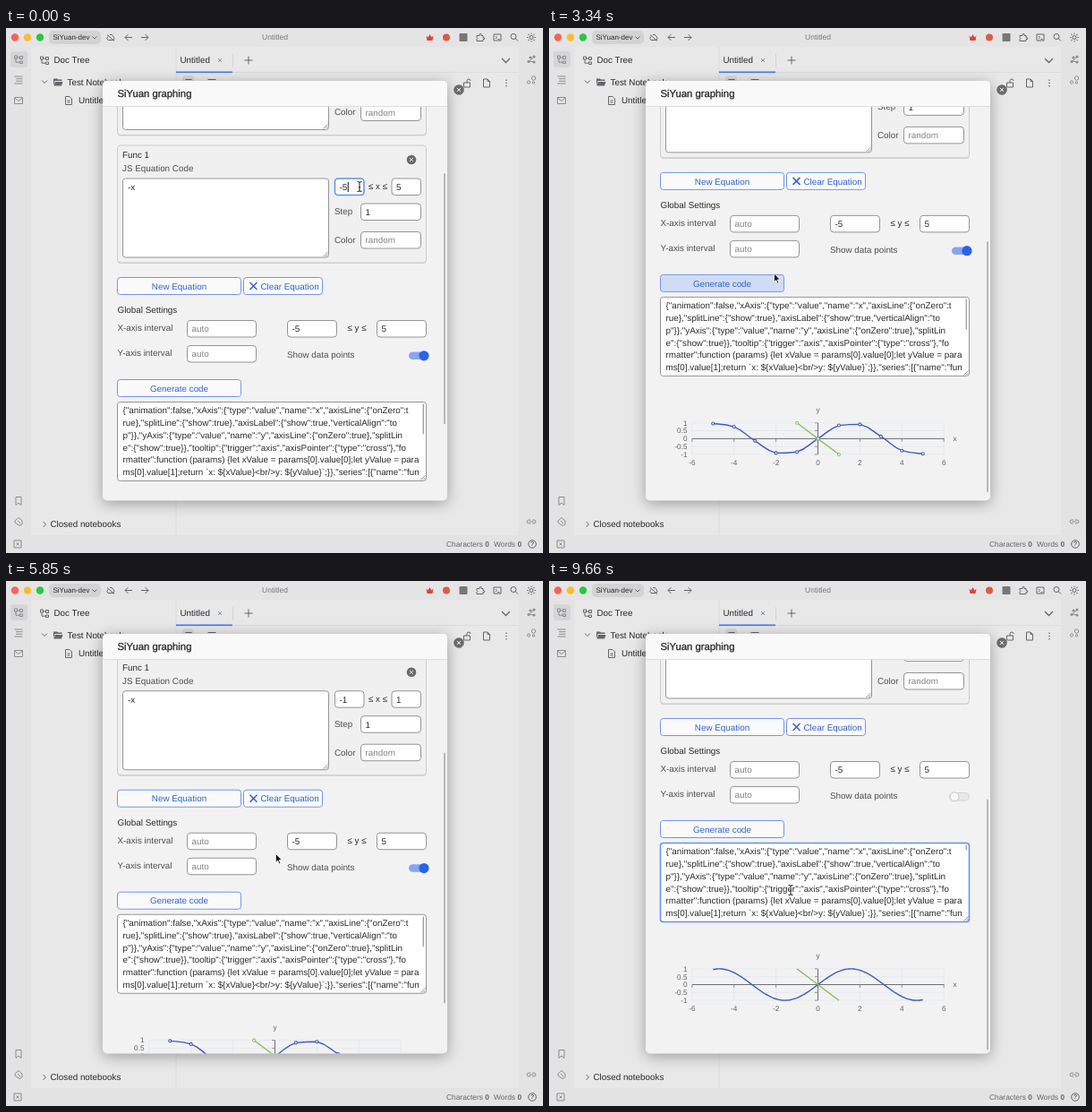
Recreate the animation shown at these times as an HTML page. Size 600 px wide and 586 px high, loop 9750 ms.

```html
<!DOCTYPE html>
<html lang="en">
<head>
<meta charset="utf-8">
<title>SiYuan graphing</title>
<style>
html, body { margin: 0; width: 100%; height: 100%; overflow: hidden; background: #e8e8e9; }
svg { display: block; position: absolute; left: 0; top: 0; }
text { font-family: "Liberation Sans", Arial, sans-serif; fill: #2a2a2c; text-rendering: geometricPrecision; white-space: pre; }
#dialog { filter: drop-shadow(0 3px 8px rgba(0, 0, 0, .33)); }
.icon { fill: none; stroke: #66666a; stroke-width: 1; }
.dock { opacity: .68; }
.medium { stroke: #2a2a2c; stroke-width: .3; }
</style>
</head>
<body>
<svg id="stage" width="600" height="586" viewBox="0 0 600 586">
  <defs>
    <clipPath id="bodyClip"><path d="M108 88H493V523Q493 527.500 488 527.500H113Q108 527.500 108 523Z"/></clipPath>
    <clipPath id="codeClip"><rect x="125" y="418" width="344" height="87"/></clipPath>
  </defs>
  <g id="app"></g>
  <g id="dialog"><rect x="108" y="59" width="385" height="468.500" rx="5" fill="#f2f2f2"/></g>
  <path d="M108 88V64Q108 59 113 59H488Q493 59 493 64V88Z" fill="#f9f9f9"/>
  <path d="M108 87.500H493" stroke="#dededf"/>
  <g clip-path="url(#bodyClip)"><g id="content"></g><rect id="thumb" x="489" width="2" height="280" rx="1" fill="#b8b8ba"/></g>
  <g id="top"></g>
</svg>
<script>
const LOOP = 9750, STEPS = 105, SIZE = 9.85;
const BLUE = '#2f62d9', GREY = '#949498', FOCUS = '#5f92f3', DIM = 'fill:#4f4f53';
const $ = id => document.getElementById(id);

function add(parent, tag, attrs, text) {
  const node = document.createElementNS('http://www.w3.org/2000/svg', tag);
  for (const name in attrs) node.setAttribute(name, attrs[name]);
  if (text !== undefined) node.textContent = text;
  parent.appendChild(node);
  return node;
}
// cy is the vertical middle of the capitals
const label = (p, x, cy, text, size = SIZE, attrs = {}) =>
  add(p, 'text', { x, y: cy + size * .35, 'font-size': size, ...attrs }, text);
const rect = (p, x, y, width, height, attrs) => add(p, 'rect', { x, y, width, height, ...attrs });
const circle = (p, cx, cy, r, attrs) => add(p, 'circle', { cx, cy, r, ...attrs });
const line = (p, d, attrs = {}) => add(p, 'path', { d, fill: 'none', stroke: '#66666a', ...attrs });
const icon = (p, x, y, d, attrs = {}) => add(p, 'path', { d, class: 'icon', transform: `translate(${x} ${y})`, ...attrs });
const setText = (node, s) => { if (node.textContent !== s) node.textContent = s; };
const set = (node, attrs) => { for (const n in attrs) node.setAttribute(n, attrs[n]); };

function closeMark(p, x, y, r) {
  circle(p, x, y, r, { fill: '#6a6a6d' });
  const a = r * .36;
  icon(p, x, y, `M${-a} ${-a}L${a} ${a}M${a} ${-a}L${-a} ${a}`, { style: 'stroke:#f4f4f4' });
}

function drawApp() {
  const p = $('app'), solid = { style: 'fill:#66666a;stroke:none' };
  rect(p, 0, 0, 600, 586, { fill: '#e8e8e9' });
  rect(p, 0, 0, 600, 21, { fill: '#e4e4e5' });
  rect(p, 0, 21, 28, 545, { fill: '#e3e3e4' });
  rect(p, 572, 21, 28, 545, { fill: '#e3e3e4' });
  rect(p, 0, 566, 600, 20, { fill: '#e3e3e4' });
  line(p, 'M190 49.500H572M190 21V566', { stroke: '#dcdcdd' });
  rect(p, 190, 48.500, 63, 1.600, { fill: '#4a78e0' });

  ['#ff5f57', '#febc2e', '#28c840'].forEach((fill, i) => circle(p, 10 + 14 * i, 10.500, 4.200, { fill }));
  rect(p, 48, 3, 58, 15, { rx: 5, fill: '#d3d3d4' });
  label(p, 52.500, 10.500, 'SiYuan-dev', 8);
  icon(p, 99, 10.500, 'M-2.500 -1L0 1.500L2.500 -1');
  icon(p, 117, 10.500, 'M-3 3H3Q5 1 3 -1Q2 -4 -1 -3M-4 -3L4 4M-3 3Q-5.500 1 -3 -1');
  icon(p, 137, 10.500, 'M4 0H-4M-.5 -3.500L-4 0L-.5 3.500');
  icon(p, 155, 10.500, 'M-4 0H4M.5 -3.500L4 0L.5 3.500');
  label(p, 300.500, 10.500, 'Untitled', 8.500, { 'text-anchor': 'middle', style: 'fill:#77777a' });
  icon(p, 473.500, 10.500, 'M-4 -2L-2 0L0 -3.500L2 0L4 -2L3 3.500H-3Z', { style: 'fill:#dc4238;stroke:none' });
  circle(p, 492, 10.500, 4, { fill: '#df5a40' });
  rect(p, 506.500, 6, 9, 9, { rx: 1, fill: '#77777a' });
  icon(p, 530, 10.500, 'M-4 -2H-1Q-1 -5 .8 -4Q1.500 -3.500 1 -2H3V0Q5 0 5 1.500Q4.500 2.500 3 2V4H-4V2Q-2 1 -4 0Z');
  icon(p, 549, 10.500, 'M-4 -3.500H4V3.500H-4ZM-2 -1.500L-.5 0L-2 1.500M.5 2H2.500');
  circle(p, 567, 9.500, 3, { class: 'icon' });
  icon(p, 567, 9.500, 'M2 2L5 5');
  circle(p, 587, 10.500, 2, { class: 'icon' });
  for (let i = 0; i < 8; i++) icon(p, 587, 10.500, 'M0 -3.500V-5', { transform: `translate(587 10.500) rotate(${i * 45})` });

  const tree = 'M-4.500 -4H-1.500V-1H-4.500ZM1.500 -3.500H4.500V-.5H1.500ZM1.500 2H4.500V4.500H1.500ZM-3 -1V3.200H1.500M-1.500 -2H1.500';
  rect(p, 5, 26, 19, 18, { rx: 3, fill: '#d5d5d7' });
  const dock = add(p, 'g', { class: 'dock' });
  icon(dock, 14, 35, tree);
  icon(dock, 14, 58, 'M-4.500 -4H4.500M-3 -1.300H4.500M-3 1.300H4.500M-4.500 4H4.500');
  icon(dock, 14, 81, 'M-4.500 -3.500H4.500V3.500H-4.500ZM-4.500 -3L0 .5L4.500 -3');
  icon(dock, 14, 528, 'M-3 -4.500H3V4.500L0 2.200L-3 4.500Z');
  icon(dock, 14, 551, 'M-4 -1L0 -4.500L4 -1V3L1 4.500L-4 1ZM-1 -1L2 2');
  icon(dock, 13, 576, 'M-4 -4H4V4H-4ZM-1.500 -1.500L1.500 1.500M1.500 -1.500L-1.500 1.500');
  icon(dock, 587, 35, 'M-3 3L3 -3M-2 2L3 3', { 'stroke-width': .8 });
  [[-3, 2.500], [3, -3], [3, 3], [-1, -2]].forEach(([x, y]) => circle(dock, 587 + x, 35 + y, 1.600, { fill: '#66666a' }));
  [[-3, 2.500, 1.600], [2.500, -2, 2.200], [2.500, 3, 1.200]].forEach(([x, y, r]) => circle(dock, 587 + x, 58 + y, r, { class: 'icon' }));
  icon(dock, 587, 551, 'M-1 -2H-2.500Q-5 -2 -5 0T-2.500 2H-1M1 -2H2.500Q5 -2 5 0T2.500 2H1M-2.500 0H2.500');
  circle(p, 588, 576, 4.300, { class: 'icon' });
  label(p, 588, 576, '?', 7, { 'text-anchor': 'middle' });

  icon(p, 43, 36, tree);
  label(p, 53.500, 36, 'Doc Tree');
  icon(p, 43, 60, 'M-3 -1.500L0 1.500L3 -1.500', { 'stroke-width': .9 });
  icon(p, 58, 60.500, 'M-5 -4H-1L0 -3H4.500V-1.500H-3.500L-5 4ZM-3 -.5H5.500L4 4H-4.500Z', solid);
  label(p, 68.500, 60.500, 'Test Notebook');
  icon(p, 70, 81, 'M-3.500 -4.500H1L3.500 -2V4.500H-3.500ZM-1.500 0H1.500M-1.500 2H1.500', { 'stroke-width': .8 });
  label(p, 81, 81, 'Untitled');
  icon(p, 43, 554, 'M-1.500 -3L1.500 0L-1.500 3');
  label(p, 49.500, 554, 'Closed notebooks');

  label(p, 194.500, 36, 'Untitled');
  icon(p, 239, 36, 'M-2 -2L2 2M2 -2L-2 2', { style: 'stroke:#909093' });
  line(p, 'M253.500 29V44', { stroke: '#d4d4d6' });
  icon(p, 271, 36, 'M-4.500 0H4.500M0 -4.500V4.500');
  icon(p, 558.500, 36, 'M-4.500 -2L0 2.500L4.500 -2', { style: 'stroke-width:1.300' });
  rect(p, 197, 53, 13, 14, { rx: 3, fill: '#d8d8da' });
  icon(p, 204, 61, 'M-3.500 -3.500H3.500');
  icon(p, 230, 61, 'M-4.500 -3.500H4.500');
  icon(p, 515, 62, 'M-3.500 -1H3.500V4H-3.500ZM0 -1V-3Q0 -5 2 -5T4 -3');
  icon(p, 537, 61.500, 'M-3.500 -4.500H1L3.500 -2V4.500H-3.500ZM1 -4.500V-2H3.500');
  [-3.200, 0, 3.200].forEach(dy => circle(p, 559, 61.500 + dy, .8, { fill: '#66666a' }));

  const status = (x, name) => {
    const t = label(p, x, 576, name + ' ', 8.400, { style: 'fill:#66666a' });
    add(t, 'tspan', { 'font-weight': 'bold' }, '0');
  };
  status(492, 'Characters');
  status(545, 'Words');
}

const content = $('content');
const outline = focused => focused ? { stroke: FOCUS, 'stroke-width': 1.500 } : { stroke: GREY, 'stroke-width': 1 };

function input(x, y, w, value, hint) {
  const box = rect(content, x + .5, y + .5, w - 1, 18.500, { rx: 3.500, fill: '#fff', stroke: GREY });
  const text = label(content, x + 5.500, y + 10, value || hint, SIZE, value ? {} : { style: 'fill:#838387' });
  const caret = rect(content, 0, y + 4.500, 1, 11, { fill: '#111' });
  const show = (s, focused, blink) => {
    setText(text, s);
    set(box, outline(focused));
    set(caret, { x: x + 6 + text.getComputedTextLength(), opacity: focused && blink ? 1 : 0 });
  };
  show(value || hint);
  return show;
}

function area(x, y, w, h) {
  const box = rect(content, x, y, w, h, { rx: 3, fill: '#fff', stroke: GREY });
  line(content, `M${x + w - 6} ${y + h - 1}l5 -5m-2.500 5l2.500 -2.500`, { stroke: '#77777a', 'stroke-width': .8 });
  return box;
}

function card(y, name, code) {
  rect(content, 124.500, y + 1, 345, 131, { rx: 3.500, fill: '#d4d4d6' });
  rect(content, 124.500, y, 345, 131, { rx: 3.500, fill: '#f0f0f0', stroke: '#cbcbcd' });
  label(content, 130, y + 11, name);
  label(content, 130, y + 25.500, 'JS Equation Code', SIZE, { style: DIM });
  closeMark(content, 453, y + 16, 5.300);
  area(130.500, y + 37, 230, 88);
  label(content, 136, y + 46.500, code);
  const lo = input(367, y + 36.500, 33.500, '-5');
  label(content, 415.500, y + 45.500, '≤ x ≤', SIZE, { 'text-anchor': 'middle' });
  const hi = input(430.500, y + 36.500, 33.500, '5');
  label(content, 367, y + 74, 'Step', SIZE, { style: DIM });
  const step = input(396, y + 64.500, 68, '1');
  label(content, 367, y + 105.500, 'Color', SIZE, { style: DIM });
  input(396, y + 96, 68, '', 'random');
  return { lo, hi, step };
}

function button(x, y, w, text, tx) {
  const box = rect(content, x, y, w, 19, { rx: 3, fill: '#fafafb', stroke: '#6f97ee' });
  label(content, tx || x + w / 2, y + 9.700, text, SIZE, { style: 'fill:' + BLUE, 'text-anchor': tx ? 'start' : 'middle' });
  return box;
}

const func0 = card(-11.500, 'Func 0', 'Math.sin(x)');
const func1 = card(131, 'Func 1', '-x');
button(124.500, 278.500, 138, 'New Equation');
button(265.500, 278.500, 88, 'Clear Equation', 284.500);
line(content, 'M272.500 284l8 8m0 -8l-8 8', { stroke: BLUE, 'stroke-width': 1.500 });
label(content, 124.500, 314.500, 'Global Settings');
label(content, 124.500, 335, 'X-axis interval', SIZE, { style: DIM });
input(202, 326, 78, '', 'auto');
input(314, 326, 56, '-5');
label(content, 392, 335, '≤ y ≤', SIZE, { 'text-anchor': 'middle' });
input(414, 326, 56, '5');
label(content, 124.500, 363, 'Y-axis interval', SIZE, { style: DIM });
input(202, 354, 78, '', 'auto');
label(content, 314, 365, 'Show data points', SIZE, { style: DIM });
const track = rect(content, 450, 361.500, 22, 8.500, { rx: 4.250 });
const knob = circle(content, 467, 365.800, 5.600, {});
const generate = button(124.500, 392.500, 138, 'Generate code');
const codeBox = area(124.500, 417.500, 345, 88);

const codeLines = [
  '{"animation":false,"xAxis":{"type":"value","name":"x","axisLine":{"onZero":t',
  'rue},"splitLine":{"show":true},"axisLabel":{"show":true,"verticalAlign":"to',
  'p"}},"yAxis":{"type":"value","name":"y","axisLine":{"onZero":true},"splitLin',
  'e":{"show":true}},"tooltip":{"trigger":"axis","axisPointer":{"type":"cross"},"fo',
  'rmatter":function (params) {let xValue = params[0].value[0];let yValue = para',
  'ms[0].value[1];return `x: ${xValue}<br/>y: ${yValue}`;}},"series":[{"name":"fun'
];
const codeText = add(content, 'g', { 'clip-path': 'url(#codeClip)' });
codeLines.forEach((s, i) => label(codeText, 130.500, 426.800 + 13.800 * i, s));
const codeThumb = rect(content, 465.600, 419.500, 1.500, 34, { rx: .7, fill: '#a4a4a7' });

// Smooth curve with control points kept between neighbouring values
function smooth(pts) {
  const clamp = (v, a, b) => Math.max(Math.min(a, b), Math.min(Math.max(a, b), v));
  const at = i => pts[Math.max(0, Math.min(pts.length - 1, i))];
  let d = 'M' + pts[0];
  for (let i = 0; i + 1 < pts.length; i++) {
    const [p, q] = [pts[i], pts[i + 1]];
    const ctrl = (o, a, b, sign, n) => o[n] + sign * (b[n] - a[n]) / 4;
    const c = [0, 1].map(n => clamp(ctrl(p, at(i - 1), q, 1, n), p[n], q[n]));
    const e = [0, 1].map(n => clamp(ctrl(q, p, at(i + 2), -1, n), p[n], q[n]));
    d += `C${c} ${e} ${q}`;
  }
  return d;
}

function chart(max, tick, step, reach, dots) {
  const g = add(content, 'g', { transform: 'translate(0 125)' });
  const X = x => 300.500 + x * 23.450, Y = y => 450.500 - y * 17.600 / max;
  const tiny = { style: 'fill:#5f6168' };
  for (let x = -6; x <= 6; x += 2) {
    line(g, `M${X(x)} 433V468`, { stroke: '#dfe4ee', 'stroke-width': .7 });
    line(g, `M${X(x)} 450.500v3.500`, { stroke: '#6e7079', 'stroke-width': .7 });
    label(g, X(x), 477.500, x, 8.200, { 'text-anchor': 'middle', ...tiny });
  }
  for (let y = -max; y <= max; y += tick) {
    line(g, `M160 ${Y(y)}H441`, { stroke: '#dfe4ee', 'stroke-width': .7 });
    line(g, `M297 ${Y(y)}h3.500`, { stroke: '#6e7079', 'stroke-width': .7 });
    if (Math.abs(y) < 6) label(g, 154.500, Y(y), y, 8.200, { 'text-anchor': 'end', ...tiny });
  }
  line(g, 'M160 450.500H441.500M300.500 433V468', { stroke: '#6e7079' });
  label(g, 453.500, 450, 'x', 8.200, { 'text-anchor': 'middle', ...tiny });
  label(g, 300.500, 418.500, 'y', 8.200, { 'text-anchor': 'middle', ...tiny });
  const series = (f, end, inc, stroke) => {
    const pts = Array.from({ length: Math.round(2 * end / inc) + 1 }, (_, i) => {
      const x = i * inc - end;
      return [X(x), Y(f(x))];
    });
    line(g, smooth(pts), { stroke, 'stroke-width': 1.400 });
    if (dots) pts.forEach(([x, y]) => circle(g, x, y, 1.500, { fill: '#fff', stroke, 'stroke-width': 1.100 }));
  };
  series(Math.sin, 5, step, '#3c5bc8');
  series(x => -x, reach, 1, '#84c568');
  return g;
}
const charts = [chart(6, 2, 1, 5, true), chart(1, .5, 1, 1, true), chart(1, .5, .1, 1, true), chart(1, .5, .1, 1, false)];

drawApp();
label($('top'), 124.500, 73.500, 'SiYuan graphing', 11.300, { class: 'medium' });
closeMark($('top'), 506, 69, 5.800);

const cursors = {
  beam: 'M-2.500 -5.500Q0 -5.500 0 -4Q0 -5.500 2.500 -5.500M0 -4.500V4.500M-2.500 5.500Q0 5.500 0 4Q0 5.500 2.500 5.500M-1.200 .8H1.200',
  arrow: 'M0 0V10L2.300 7.900L4 11.600L5.600 10.900L4 7.300H7Z',
  hand: 'M-2.300 -4.500Q-1 -5.800 -.3 -4.200L.6 -1L4 -.2Q5.600 .3 5.200 2.500L4.300 6H-.8L-4.300 2Q-4.600 .6 -2.800 1.200L-1.600 2Z'
};
for (const kind in cursors) {
  const g = add($('top'), 'g', {});
  if (kind === 'beam') {
    line(g, cursors.beam, { stroke: '#fff', 'stroke-width': 2.400 });
    line(g, cursors.beam, { stroke: '#2a2a2a', 'stroke-width': 1.100 });
  } else {
    const hand = kind === 'hand';
    add(g, 'path', { d: cursors[kind], fill: hand ? '#fff' : '#111', stroke: hand ? '#111' : '#fff', 'stroke-width': .9 });
  }
  cursors[kind] = g;
}

// [step, x, y, cursor]
const moves = [
  [0, 395, 177, 'beam'], [6, 395, 177, 'beam'], [8, 452, 178, 'beam'], [15, 452, 178, 'arrow'],
  [23, 241, 281, 'hand'], [35, 241, 281, 'arrow'], [42, 428, 148, 'arrow'], [45, 428, 148, 'arrow'],
  [47, 431, 166, 'beam'], [56, 431, 166, 'beam'], [59, 334, 319, 'beam'], [61, 334, 319, 'arrow'],
  [66, 241, 277, 'hand'], [77, 241, 277, 'arrow'], [82, 474, 242, 'arrow'], [86, 448, 241, 'arrow'],
  [88, 458, 240, 'hand'], [91, 458, 240, 'arrow'], [96, 241, 277, 'hand'], [99, 241, 277, 'arrow'],
  [102, 270, 345, 'beam'], [105, 270, 345, 'beam']
];
const scrolls = [[0, 111], [14, 111], [20, 236], [35, 236], [43, 52.500], [45, 9.500], [60, 9.500], [65, 236], [105, 236]];
const loTyped = [[0, '-5'], [3, '-'], [5, '-1']];
const hiTyped = [[0, '5'], [10, ''], [11, '1']];
const stepTyped = [[0, '1'], [51, '0'], [52, '0.'], [54, '0.1']];
const fills = [[0, ''], [23, 'hover'], [36, 'focus'], [48, ''], [66, 'hover'], [78, 'focus'], [83, ''], [96, 'hover'], [100, '']];
const focuses = [[0, 'lo'], [9, 'hi'], [28, ''], [48, 'step'], [71, ''], [102, 'code']];
const plots = [[0, 0], [28, 1], [71, 2], [98, 3]];

const last = (table, k) => table.filter(row => row[0] <= k).pop();
function between(table, k) {
  const i = Math.max(0, table.findIndex(row => row[0] > k) - 1), a = table[i], b = table[i + 1];
  const u = (k - a[0]) / (b[0] - a[0]), s = u * u * (3 - 2 * u);
  return n => a[n] + (b[n] - a[n]) * s;
}

function draw(k) {
  const scroll = between(scrolls, k)(1);
  set(content, { transform: `translate(0 ${111 - scroll})` });
  set($('thumb'), { y: 90 + .65 * scroll });

  const focus = last(focuses, k)[1], blink = k % 12 < 6, plot = last(plots, k)[1];
  func1.lo(last(loTyped, k)[1], focus === 'lo', blink);
  func1.hi(last(hiTyped, k)[1], focus === 'hi', blink);
  func0.step(last(stepTyped, k)[1], focus === 'step', blink);
  set(codeBox, outline(focus === 'code'));
  set(codeThumb, { height: plot > 1 ? 6 : 34 });
  set(generate, { fill: { hover: '#a4bbf3', focus: '#d1dcf4' }[last(fills, k)[1]] || '#fafafb' });

  const on = k < 89;
  set(track, { x: on ? 450 : 447.500, fill: on ? '#86a6f0' : '#e8e8ea', stroke: on ? 'none' : '#d0d0d3' });
  set(knob, { cx: on ? 467 : 453, r: on ? 5.600 : 5, fill: on ? '#2b63e6' : '#f8f8f9', stroke: on ? 'none' : '#c6c6ca' });
  charts.forEach((g, i) => set(g, { display: i === plot ? 'inline' : 'none' }));

  const pos = between(moves, k), now = last(moves, k)[3];
  for (const kind in cursors) {
    set(cursors[kind], { display: kind === now ? 'inline' : 'none', transform: `translate(${pos(1)} ${pos(2)})` });
  }
}

let shown = -1;
function tick() {
  const k = Math.floor((performance.now() % LOOP + 5) * STEPS / LOOP) % STEPS;
  if (k !== shown) draw(shown = k);
  requestAnimationFrame(tick);
}
tick();
</script>
</body>
</html>
```
